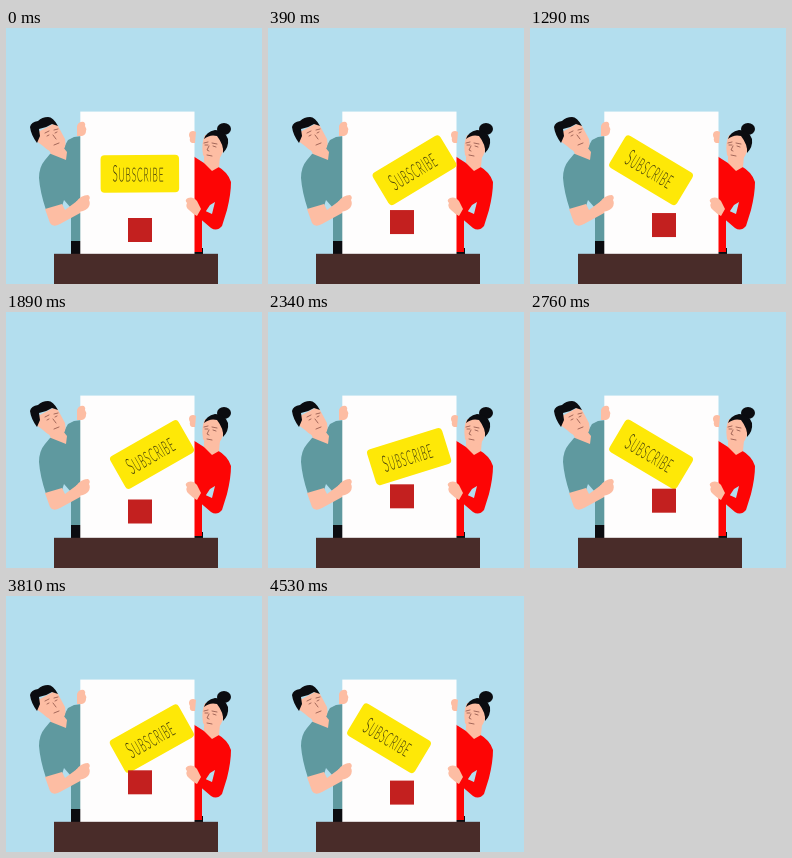
Recreate the animation shown at these times as an HTML page. Size 256 by 256 pixels, loop 4.56 s.

```html
<!DOCTYPE html>
<html lang="en">
<head>
<meta charset="utf-8">
<title>Subscribe board</title>
<style>
  html, body { margin: 0; height: 100%; overflow: hidden; background: #b3deee; }
  svg { display: block; width: 100%; height: 100%; }
  .skin { fill: #fdbda3; }
  .hair { fill: #0b0c10; }
  .shirt { fill: #5f999f; }
  .blouse { fill: #fd0505; }
  .face { fill: none; stroke: #8f5348; stroke-width: .8; stroke-linecap: round; }
  text { font: 300 19.5px Lato, sans-serif; letter-spacing: 2px; text-anchor: middle; fill: #3a350c; }
</style>
</head>
<body>
<svg viewBox="0 0 256 256">
  <rect width="256" height="256" fill="#b3deee"/>

  <g id="man">
    <path class="hair" d="M65 208H76V227H65Z"/>
    <path class="shirt" d="M44 126L57 121L62 112L68 109L76 108V213H65V180L58 172L56 178L40 182Q34 164 33 150Q33 139 39 132Z"/>
    <path class="skin" d="M39 181L56 176L59 182L71 173H76V184L54 196Q47 200 44 195Z"/>
    <path class="skin" d="M40 116L57 119L61 124L60 132L45 126Z"/>
    <path class="skin" d="M28 107L32 104L49 95L52 98L59 111Q61 121 55 123Q46 127 37 118L33 115Q28 112 28 107Z"/>
    <path class="hair" d="M31 115Q25 107 24 99Q25 94 32 93Q36 89 42 89Q47 89 52 98L46 96Q40 100 33 101L34 108Z"/>
    <path class="face" d="M39 105L43 103M48 102L52 101M41 108L43 107M49 105L51 104M47 107L50 111M48 117L53 115"/>
  </g>

  <g id="woman">
    <path class="hair" d="M187 220H197V227H187Z"/>
    <path class="blouse" d="M187 128L198 135L211 138Q222 144 225 154Q225 166 221 182L216 198Q211 204 205 200L191 188L195 181L206 186L209 174L204 177L196 189V224H187Z"/>
    <path class="skin" d="M198 129L214 128L213 139L206 143L198 135Z"/>
    <path class="skin" d="M199 107L213 106L219 117Q216 130 209 135Q201 134 197 127Q195 115 199 107Z"/>
    <ellipse class="hair" cx="218" cy="101" rx="7" ry="6"/>
    <path class="hair" d="M198 111Q200 104 209 102Q219 102 222 111Q223 119 217 125Q218 117 211 108Q204 106 198 111Z"/>
    <path class="face" d="M198 115L202 114M206 115L211 116M199 117L202 117M207 118L210 119M203 118L201 122L203 123M201 127L206 128"/>
  </g>

  <rect x="74.300" y="83.600" width="114.200" height="143" fill="#fefdfd"/>
  <g class="skin">
    <path d="M71 98Q73 93 78 94Q80 96 79 98Q81 101 80 103Q80 107 76 108H71Z"/>
    <path d="M70 174Q75 167 82 167Q85 169 83 172Q85 176 82 180Q78 184 70 184Z"/>
    <path d="M190 104Q187 102 184 104Q182 107 184 110Q183 114 186 115H189Z"/>
    <path d="M191 173Q187 168 182 170Q178 172 181 175Q179 179 183 182Q187 186 191 188L195 181Z"/>
  </g>
  <rect x="48" y="225.800" width="164" height="31" fill="#492c29"/>

  <g id="sign">
    <rect x="94.500" y="127" width="78.500" height="37.500" rx="4" fill="#fee807"/>
    <text transform="translate(132.300 153.500) scale(.43 1)"><tspan font-size="23">S</tspan>UBSCRIBE</text>
  </g>
  <rect id="badge" x="122" y="-12" width="24" height="24" fill="#c3201f"/>
</svg>
<script>
  const LOOP = 4560, PERIOD = 1625, TILT = 31;
  const sign = document.getElementById('sign');
  const badge = document.getElementById('badge');

  const easeInOut = u => u < .5 ? 4 * u ** 3 : 1 - 4 * (1 - u) ** 3;

  // 0 -> 1 -> 0 over one period, eased both ways
  const sway = time => {
    const phase = time / PERIOD % 1;
    return easeInOut(1 - Math.abs(2 * phase - 1));
  };

  function draw(now) {
    const t = now % LOOP;
    const angle = TILT * (1 - 2 * sway(t + PERIOD / 4));
    sign.setAttribute('transform', `rotate(${angle} 133.7 121)`);
    badge.setAttribute('transform', `translate(0 ${202 - 17.8 * sway(t)})`);
  }

  const start = performance.now();
  function tick() {
    draw(performance.now() - start);
    requestAnimationFrame(tick);
  }
  tick();
</script>
</body>
</html>
```
